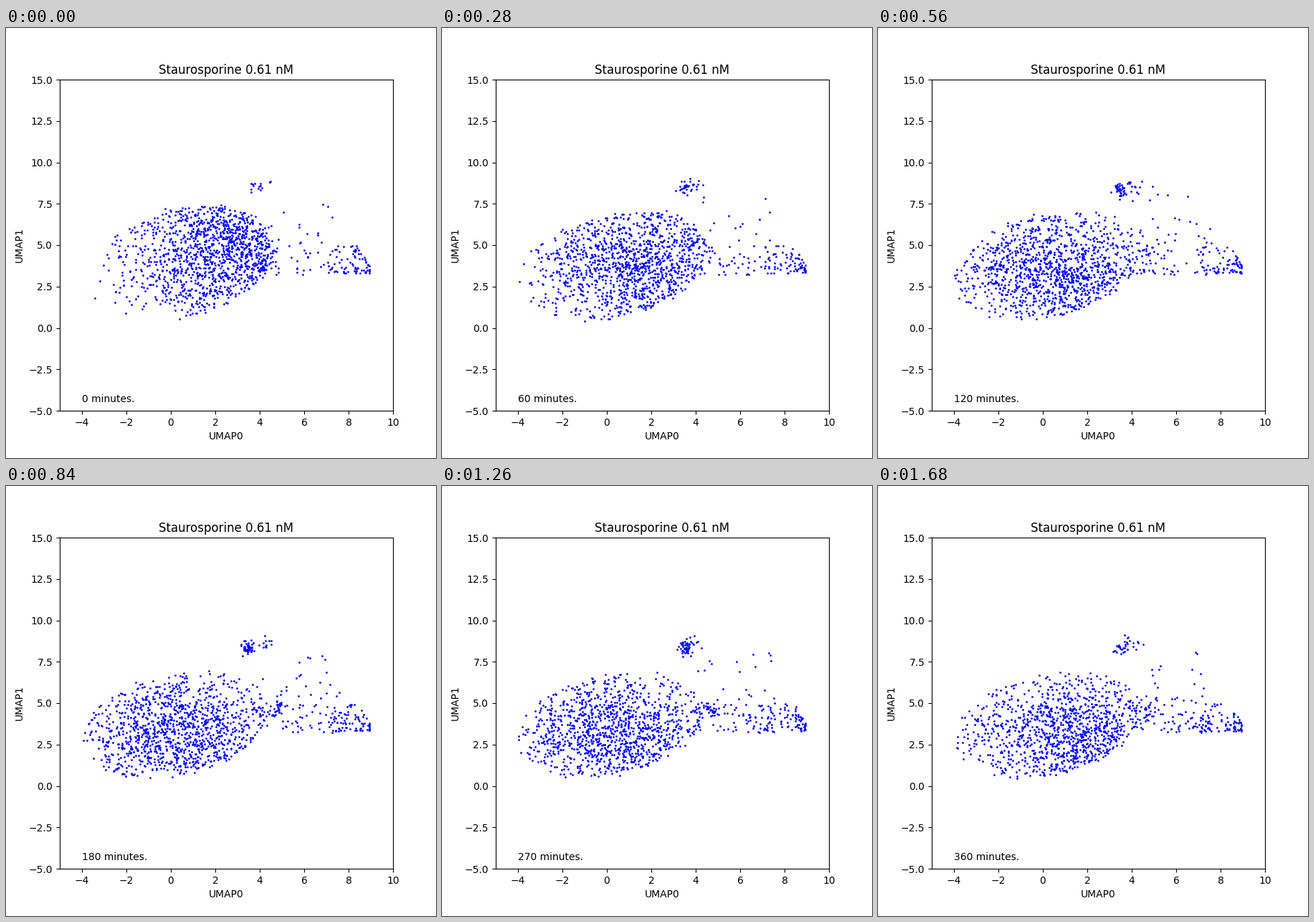
Animation of 600 by 600 pixels, one loop 1.82 s. Source, as a matplotlib script:

```python
import numpy as np
import matplotlib.pyplot as plt
from matplotlib.animation import FuncAnimation

FRAMES, INTERVAL, STEP = 13, 140, 30
TILT = 0.27


def blob(rng, n, x, y, sx, sy):
    return rng.normal((x, y), (sx, sy), (int(n), 2))


def cloud(rng, n, k):
    """Tilted ellipse of cells, densest around a focus that drifts left."""
    early = np.exp(-k / 3)
    cx, cy = 0.15 + 0.25 * early, 3.7 + 0.2 * early
    rx, ry = 4.2, 3.2 + 0.3 * early
    fx = 2.9 * early + 1.3 * (k / 12) ** 4
    fy = 3.0 + 1.8 * early
    sx, sy = 2.6, 1.9 + 0.7 * early

    u, v = rng.uniform(-1, 1, (2, 20 * n))
    x = cx + rx * u
    y = cy + ry * (TILT * u + np.sqrt(1 - TILT**2) * v)
    weight = np.exp(-((x - fx) / sx) ** 2 / 2 - ((y - fy) / sy) ** 2 / 2)
    keep = (u**2 + v**2 < 1) & (rng.random(u.size) < weight)
    pts = np.column_stack([x, y])[keep][:n]
    return pts + rng.normal(0, 0.06, pts.shape)


def wing(rng, n):
    """Cells on the right, narrowing to a tip."""
    x = 8.95 - 1.9 * rng.random(n) ** 1.5
    top = np.minimum(5, 3.7 + 2.2 * (9 - x))
    return np.column_stack([x, 3.3 + (top - 3.3) * rng.random(n) ** 1.4])


def bridge(rng, n):
    """Loose cells between the cloud and the wing."""
    x = rng.uniform(3.9, 7.6, n)
    return np.column_stack([x, 3.2 + 3.3 * rng.beta(1, 2.2, n)])


def cells(k):
    rng = np.random.default_rng(610 + k)
    swell = np.sin(np.pi * k / 14)
    return np.vstack([
        cloud(rng, 1250 - 12 * k, k),
        blob(rng, 45 * swell, 3.5, 8.35, 0.15, 0.2),
        blob(rng, 15, 3.95, 8.6, 0.28, 0.22),
        blob(rng, 25 * np.sin(np.pi * k / 16) ** 2, 4.75, 4.65, 0.15, 0.2),
        wing(rng, 75),
        bridge(rng, 45 + 4 * k),
        rng.uniform((4, 5.5), (7.4, 8.1), (int(6 + 8 * swell), 2)),
    ])


fig, ax = plt.subplots(figsize=(6, 6), dpi=100)
ax.set(xlim=(-5, 10), ylim=(-5, 15), xlabel="UMAP0", ylabel="UMAP1",
       title="Staurosporine 0.61 nM")
dots, = ax.plot([], [], "b.", markersize=2)
label = ax.text(-4, -4.5, "")


def update(k):
    dots.set_data(*cells(k).T)
    label.set_text(f"{k * STEP} minutes.")
    return dots, label


anim = FuncAnimation(fig, update, frames=FRAMES, interval=INTERVAL, repeat=True)
plt.show()
```
